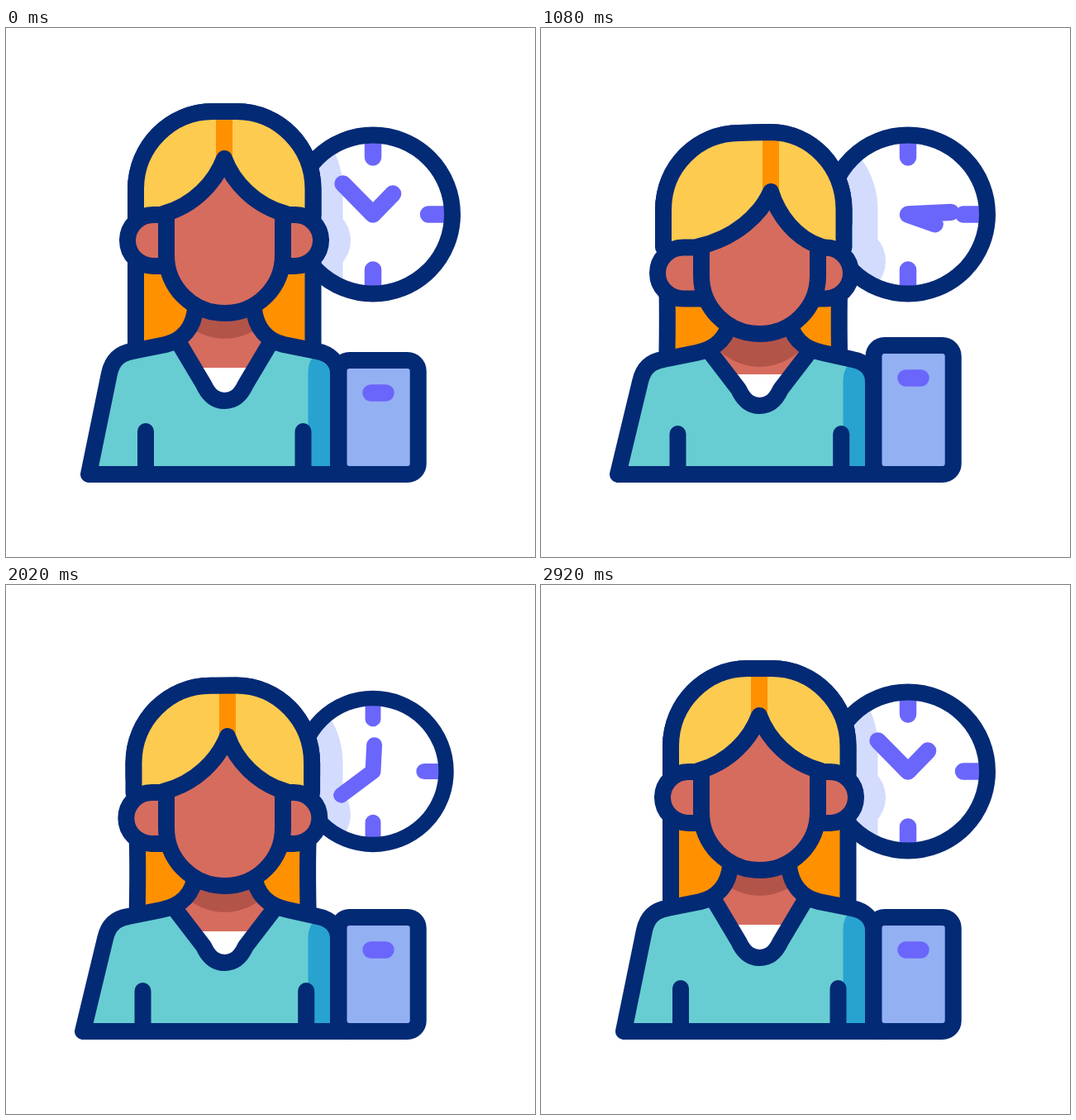
Recreate the animation shown at these times as an HTML page. Size 640 by 640 pixels, loop 3.16 s.

```html
<!DOCTYPE html>
<html lang="en">
<head>
<meta charset="utf-8">
<title>Working hours</title>
<style>
html, body { margin: 0; width: 100%; height: 100%; overflow: hidden; background: #fff; }
svg { display: block; width: 100%; height: 100%; }
.line { fill: none; stroke: #032a75; stroke-width: 20; stroke-linecap: round; stroke-linejoin: round; }
.accent { fill: none; stroke: #6b66fb; stroke-width: 20.5; stroke-linecap: round; stroke-linejoin: round; }
.skin { fill: #d66c5e; }
</style>
</head>
<body>
<svg viewBox="0 0 640 640">
  <defs>
    <clipPath id="dialClip"><circle id="dialClipShape" cx="444" cy="225.5" r="96"/></clipPath>
    <clipPath id="neckClip"><path id="neckClipShape"/></clipPath>
  </defs>

  <g id="dial">
    <circle r="96" fill="#fff"/>
  </g>
  <g clip-path="url(#dialClip)">
    <g id="cast" fill="#d3dcfd">
      <path d="M305 91C362 91 407.5 138 407.5 195V360H300Z"/>
      <circle cx="376" cy="257" r="41"/>
    </g>
  </g>
  <g id="dialFront">
    <path class="accent" d="M0 -90V-69M0 90V67M90 0H67"/>
    <path class="accent" id="hands"/>
    <circle class="line" r="96"/>
  </g>

  <path id="backHair" class="line" style="fill:#ff9100"/>

  <path id="shirt" fill="#fff"/>
  <path id="neck" class="skin"/>
  <g clip-path="url(#neckClip)"><path id="chinShade" fill="#b35449"/></g>
  <path id="top" fill="#67cdd2"/>
  <path id="side" fill="#28a2cf"/>
  <path id="bodyLine" class="line"/>

  <rect id="box" class="line" style="fill:#93b0f3" rx="13"/>
  <path id="grip" class="accent"/>

  <path id="fringeFill" fill="#fdcb50"/>
  <path id="parting" stroke="#ff9100" stroke-width="20"/>
  <path id="hairLine" class="line"/>
  <path id="ears" class="line" style="fill:#d66c5e"/>
  <path id="face" class="skin"/>
  <path id="faceLine" class="line"/>
</svg>
<script>
const LOOP = 3160;
const $ = id => document.getElementById(id);
const draw = (id, d) => $(id).setAttribute('d', d);

// Smooth curve through keys, without overshoot between them.
function track(times, values) {
  const last = times.length - 1;
  const rate = i => (values[i + 1] - values[i]) / (times[i + 1] - times[i]);
  const slope = values.map((_, i) => {
    if (i === 0 || i === last) return 0;
    const a = rate(i - 1), b = rate(i);
    return a * b > 0 ? 2 * a * b / (a + b) : 0;
  });
  return t => {
    if (t <= times[0]) return values[0];
    if (t >= times[last]) return values[last];
    let i = 0;
    while (t > times[i + 1]) i++;
    const h = times[i + 1] - times[i], u = (t - times[i]) / h, v = 1 - u;
    return values[i] * v * v * (1 + 2 * u) + slope[i] * h * u * v * v
         + values[i + 1] * u * u * (3 - 2 * u) - slope[i + 1] * h * u * u * v;
  };
}

const KEYS = [200, 460, 660, 920, 1080, 1440, 1560, 2020, 2360, 2700];
const pose = {
  crown:  track(KEYS, [0, -15, 2.5, 26, 25, -5.5, -14, 20.5, -8, 0]),
  ear:    track(KEYS, [0, -30, -14.5, 39, 39.5, -8, -16, 25, -21.5, 0]),
  tip:    track(KEYS, [0, -18, -2, 41, 40, -9, -16, 25, -12, 0]),
  chin:   track(KEYS, [0, -16, -3, 26, 25, -9.5, -15, 19, -13, 0]),
  shade:  track(KEYS, [0, -12, 5, 34, 34, -5, -13, 20, -15, 0]),
  turn:   track(KEYS, [0, 0, 0, .7, 1, 1, 1, .28, 0, 0]),
  sink:   track(KEYS, [0, -.9, 0, 1, 1, -.6, -1, 1, -.87, 0]),
  spread: track(KEYS, [0, 3, 6, -2, -3.5, 3, 4, -4.5, 1, 0]),
  box:    track(KEYS, [0, 0, 9.5, -10, -18, 16, 10, 0, 0, 0])
};
const dialSize = track([1080, 1440, 1780, 2020, 2360, 2440, 2700],
                       [1, 1.076, 1.112, .922, 1.03, 1.04, 1]);

// Eased progress of the clock hands, cubic-bezier(.597, 0, .37, 1).
function handTurn(t) {
  const x = Math.min(1, Math.max(0, (t - 200) / 2600));
  let lo = 0, hi = 1;
  for (let i = 0; i < 24; i++) {
    const s = (lo + hi) / 2, r = 1 - s;
    if (3 * r * r * s * .597 + 3 * r * s * s * .37 + s * s * s < x) lo = s; else hi = s;
  }
  return lo * lo * (3 - 2 * lo);
}

function polar(deg, len) {
  const a = deg * Math.PI / 180;
  return `${len * Math.sin(a)} ${-len * Math.cos(a)}`;
}

function drawClock(t, p) {
  const k = dialSize(t), turn = handTurn(t);
  const place = `translate(444 225.5) scale(${k})`;
  $('dial').setAttribute('transform', place);
  $('dialFront').setAttribute('transform', place);
  $('dialClipShape').setAttribute('r', 96 * k);
  $('cast').setAttribute('transform', `translate(0 ${p.crown})`);
  draw('hands', `M${polar(-44.5 + 720 * turn, 52)}L0 0L${polar(44 + 360 * turn, 34.6)}`);
}

function drawBody(p) {
  const b = p.sink, y = 10 * b, x = 5 * b;
  const low = 451 + 6 * b, hem = 411 + 8 * b;
  const left = `M${100 - 7 * b} 540L${125 - x} ${418 + y}`
    + `C${129 - x} ${400 + y} ${140 - x} ${393 + y} ${153 - x} ${391 + y}`
    + `L${193 - x} ${383 + y}`;
  const right = `L${336 + x} ${383 + y}L${376 + b} ${391 + y}`
    + `C${392 + b} ${394 + y} 402 ${404 + y} 402 ${418 + y}V540Z`;
  const collar = `${211 - x} ${384 + y}L239 ${low - 20}C246 ${low - 5} 254 ${low} 264.5 ${low}`
    + `S283 ${low - 5} 290 ${low - 20}L${318 + x} ${384 + y}`;
  const neckLeft = `M229 ${340 + y}C227 ${362 + y} 214 ${378 + y} ${193 - x} ${383 + y}`;
  const neckRight = `M300 ${340 + y}C302 ${362 + y} 315 ${378 + y} ${336 + x} ${383 + y}`;
  const neck = `M229 300V${340 + y}C227 ${362 + y} 218 ${376 + y} ${211 - x} ${384 + y}`
    + `L227 ${hem}H302L${318 + x} ${384 + y}`
    + `C311 ${376 + y} 302 ${362 + y} 300 ${340 + y}V300Z`;
  const shade = 376 + p.shade;

  draw('shirt', `M${collar}Z`);
  draw('neck', neck);
  draw('neckClipShape', neck);
  draw('chinShade', `M204 290V${shade - 35}A70 70 0 0 0 325 ${shade - 35}V290Z`);
  draw('top', `${left}L${collar}${right}`);
  draw('side', `M365.5 540V${417 + y}Q365.5 ${407 + y} 370 ${400 + y}`
    + `C390 ${397 + y} 402 ${406 + y} 402 ${418 + y}V540Z`);
  draw('bodyLine', `${left}${neckLeft}${neckRight}${right.replace('L', 'M').replace('Z', '')}`
    + `M430 540H${100 - 7 * b}M${collar}`
    + `M${169 - 3.5 * b} 540V${488 + 3 * b}M${359.5 + 3.7 * b} 540V${488 + 3 * b}`);
}

function drawBox(p) {
  const wide = Math.max(0, p.box) * .2, top = 402 + p.box;
  const box = $('box');
  box.setAttribute('x', 402.5 - wide);
  box.setAttribute('y', top);
  box.setAttribute('width', 96.2 + 2 * wide);
  box.setAttribute('height', 540 - top);
  draw('grip', `M${441.5 - wide} ${top + 39.5}H${459.5 + wide}`);
}

function drawHead(p) {
  const q = p.turn, s = p.spread, c = p.crown;
  const hl = 157 - 9 * q, hr = 371.5 - 5 * q;
  const top = 101 + c, side = 195 + c;
  const ear = 257 + p.ear, brow = ear - 31, jaw = 275 + p.chin;
  const tx = 264 + 14 * q, ty = 158 + p.tip;

  const crown = `C${hl} ${side - 52} ${199 - 10 * q} ${top + q} ${250 - 10 * q} ${top + q}`
    + `L${279 - 2 * q} ${top}C${330 - 3 * q} ${top} ${hr} ${side - 52} ${hr} ${side}`;
  const mid = -7.5 * q, end = 396 + 8 * p.sink;
  const bl = 157 + mid, br = 371.5 + mid;
  draw('backHair', `M${bl - .8 * s} ${end}C${bl - 1.1 * s} 345 ${bl - 1.1 * s} 295 ${hl} ${side + 15}`
    + `V${side}${crown}V${side + 15}`
    + `C${br + 1.1 * s} 295 ${br + 1.1 * s} 345 ${br + .8 * s} ${end}`);

  const lx = 178 - 6 * q, rx = 350 - 6 * q;
  draw('ears', `M194 ${brow}H${lx}A31 31 0 0 0 ${lx} ${ear + 31}H194`
    + `M335 ${brow}H${rx}A31 31 0 0 1 ${rx} ${ear + 31}H335`);

  // Fringe strands run from the brow ends to the tip of the parting.
  const by = brow - 1, drop = by - ty;
  const near = x => `${tx + (x - tx) * .14} ${ty + drop * .42}`;
  const far = x => `${tx + (x - tx) * .49} ${ty + drop * .85}`;
  const fringe = `190 ${by}C${far(190)} ${near(190)} ${tx} ${ty}`
    + `C${near(339)} ${far(339)} 339 ${by}`;
  const cheeks = `V${jaw}A70.5 70 0 0 1 194 ${jaw}V${brow}`;

  draw('fringeFill', `M${hl} ${brow}V${side}${crown}V${brow}H339`
    + `C${far(339)} ${near(339)} ${tx} ${ty}C${near(190)} ${far(190)} 190 ${by}Z`);
  draw('parting', `M${tx} ${top}V${ty}`);
  draw('hairLine', `M${hl} ${brow}V${side}${crown}V${brow}`);
  draw('face', `M${fringe}L335 ${brow}${cheeks}Z`);
  draw('faceLine', `M${fringe}M335 ${brow}${cheeks}`);
}

function render(t) {
  const p = {};
  for (const name in pose) p[name] = pose[name](t);
  drawClock(t, p);
  drawBody(p);
  drawBox(p);
  drawHead(p);
}

const start = performance.now();
function tick() {
  render((performance.now() - start) % LOOP);
  requestAnimationFrame(tick);
}
render(0);
requestAnimationFrame(tick);
</script>
</body>
</html>
```
